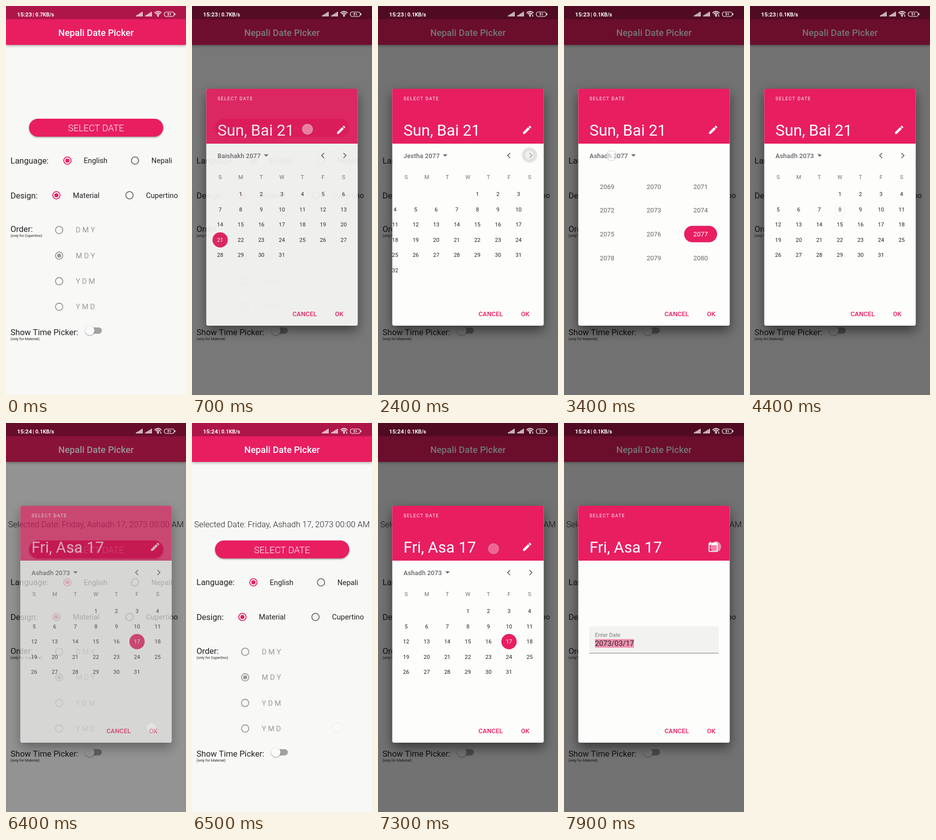
Animation of 360x780 px, one loop 8000 ms. Source, as an HTML page with a canvas:

```html
<!DOCTYPE html>
<html lang="en">
<head>
<meta charset="utf-8">
<title>Nepali Date Picker</title>
<style>
html, body { margin: 0; width: 100%; height: 100%; overflow: hidden; background: #f8f9f7; }
canvas { display: block; width: 360px; height: 780px; }
</style>
</head>
<body>
<canvas id="stage"></canvas>
<script>
const W = 360, H = 780, LOOP = 8000;
const PINK = '#e81e61', PAGE = '#f8f9f7', INK = '#222', SOFT = '#666';
const dpr = window.devicePixelRatio || 1;
const stage = document.getElementById('stage');
const layer = document.createElement('canvas');
for (const c of [stage, layer]) { c.width = W * dpr; c.height = H * dpr; }
const view = stage.getContext('2d'), sheet = layer.getContext('2d');
let g = view;

const EDIT = new Path2D('M3 17.25V21h3.75L17.81 9.94l-3.75-3.75L3 17.25zM20.71 7.04c.39-.39.39-1.02 0-1.41l-2.34-2.34c-.39-.39-1.02-.39-1.41 0l-1.83 1.83 3.75 3.75 1.83-1.83z');
const CALENDAR = new Path2D('M20 3h-1V1h-2v2H7V1H5v2H4c-1.1 0-2 .9-2 2v16c0 1.1.9 2 2 2h16c1.1 0 2-.9 2-2V5c0-1.1-.9-2-2-2zm0 18H4V8h16v13z');

const MONTHS = {
  bai77: { name: 'Baishakh 2077', first: 1, days: 31, sel: 21 },
  jes77: { name: 'Jestha 2077', first: 4, days: 32 },
  ash77: { name: 'Ashadh 2077', first: 1, days: 31 },
  ash73: { name: 'Ashadh 2073', first: 3, days: 31 }
};

const clamp = x => Math.max(0, Math.min(1, x));
const ramp = (t, from, to) => clamp((t - from) / (to - from));

function bezier(x1, y1, x2, y2) {
  const at = (a, b, s) => 3 * a * s * (1 - s) ** 2 + 3 * b * s * s * (1 - s) + s ** 3;
  return x => {
    let lo = 0, hi = 1;
    for (let i = 0; i < 20; i++) {
      const mid = (lo + hi) / 2;
      if (at(x1, x2, mid) < x) lo = mid; else hi = mid;
    }
    return x <= 0 ? 0 : x >= 1 ? 1 : at(y1, y2, lo);
  };
}
const ease = bezier(.25, .1, .25, 1);
const easeOut = bezier(0, 0, .58, 1);

// y is the middle of the capital letters
function text(str, x, y, size, { color = INK, weight = 400, align = 'left', gap = 0 } = {}) {
  g.font = `${weight} ${size}px Roboto, sans-serif`;
  g.letterSpacing = gap + 'px';
  g.textAlign = align;
  g.fillStyle = color;
  g.fillText(str, x, y + size * .356);
  return g.measureText(str).width;
}

function disc(x, y, r, color) {
  g.beginPath();
  g.arc(x, y, r, 0, 7);
  g.fillStyle = color;
  g.fill();
}

function box(x, y, w, h, r, color) {
  g.beginPath();
  g.roundRect(x, y, w, h, r);
  g.fillStyle = color;
  g.fill();
}

function line(points, color, width) {
  g.beginPath();
  points.forEach(([x, y]) => g.lineTo(x, y));
  g.strokeStyle = color;
  g.lineWidth = width;
  g.stroke();
}

function withShadow(color, blur, dy, draw) {
  g.save();
  g.shadowColor = color;
  g.shadowBlur = blur * dpr;
  g.shadowOffsetY = dy * dpr;
  draw();
  g.restore();
}

function radio(x, y, on, color) {
  g.beginPath();
  g.arc(x, y, 7.33, 0, 7);
  g.strokeStyle = color;
  g.lineWidth = 1.83;
  g.stroke();
  if (on) disc(x, y, 4.12, color);
}

function option(label, x, textX, y, on, color, ink) {
  radio(x, y, on, color);
  text(label, textX, y, 14.66, { color: ink });
}

function page(picked) {
  g.fillStyle = PAGE;
  g.fillRect(0, 0, W, H);
  withShadow('rgba(0,0,0,.3)', 5, 2, () => box(0, 0, W, 78, 0, PINK));
  g.fillStyle = '#ae1649';
  g.fillRect(0, 0, W, 26.5);
  text('Nepali Date Picker', 180, 53, 18.33, { color: '#fff', weight: 500, align: 'center' });

  if (picked)
    text('Selected Date: Friday, Ashadh 17, 2073 00:00 AM', 180, 203.5, 16.5, { weight: 300, align: 'center' });

  g.save();
  g.translate(0, picked ? 9.5 : 0);
  withShadow('rgba(0,0,0,.35)', 3, 1.8, () => box(46, 226, 268.5, 36, 18, PINK));
  text('SELECT DATE', 180, 244.5, 18.33, { color: '#fff', weight: 300, align: 'center' });

  text('Language:', 9, 310, 16.5);
  option('English', 122.8, 155.5, 310, true, PINK, INK);
  option('Nepali', 258, 290.7, 310, false, '#6d6d6c', INK);
  text('Design:', 9, 379.8, 16.5);
  option('Material', 100.8, 133.7, 379.5, true, PINK, INK);
  option('Cupertino', 247, 280, 379.5, false, '#6d6d6c', INK);

  text('Order:', 9, 447.5, 16.5);
  text('(only for Cupertino)', 9, 460.5, 7.33);
  ['D M Y', 'M D Y', 'Y D M', 'Y M D'].forEach((name, i) =>
    option(name, 106.3, 139.5, 449.2 + i * 51.3, i === 1, '#9a9a99', '#9a9a99'));

  text('Show Time Picker:', 9, 653.8, 16.5);
  text('(only for Material)', 9, 667, 7.33);
  box(161.5, 644.4, 30.2, 12.8, 6.4, '#a2a2a1');
  withShadow('rgba(0,0,0,.4)', 2.5, 1, () => disc(167.8, 650.8, 9.2, '#fafafa'));
  g.restore();
}

function statusBar(t) {
  const white = '#fff';
  text(t < 6200 ? '15:23' : '15:24', 22, 16.5, 11.6, { color: white, weight: 700 });
  text(t < 2300 ? '| 0.7KB/s' : '| 0.1KB/s', 53.5, 16.8, 10.4, { color: white, weight: 700 });
  for (const x of [260, 278.5])
    for (let i = 0; i < 5; i++) box(x + i * 2.8, 18.7 - i * 1.75, 1.9, 2.3 + i * 1.75, 0, white);
  for (const r of [3.2, 6.4, 9.6]) {
    g.beginPath();
    g.arc(304, 20.5, r, -Math.PI * .76, -Math.PI * .24);
    g.strokeStyle = white;
    g.lineWidth = 1.6;
    g.stroke();
  }
  disc(304, 20, 1.5, white);
  if (t > 1400) {
    line([[309.5, 17], [309.5, 21]], white, 1);
    line([[308, 19.7], [309.5, 21.2], [311, 19.7]], white, .8);
  }
  g.beginPath();
  g.roundRect(316.5, 12, 20, 9, 4.3);
  g.strokeStyle = white;
  g.lineWidth = 1.2;
  g.stroke();
  box(337.3, 14.6, 1.4, 3.8, .7, white);
  text('51', 326.7, 16.6, 7.2, { color: white, weight: 700, align: 'center' });
}

function monthGrid(m, dx, sel) {
  for (let d = 1; d <= m.days; d++) {
    const cell = m.first + d - 1;
    const x = 56.3 + (cell % 7) * 41.15 + dx;
    const y = 377.3 + Math.floor(cell / 7) * 30.55;
    if (d === sel) disc(x, y, 15.3, PINK);
    text(String(d), x, y, 11, { color: d === sel ? '#fff' : INK, align: 'center' });
  }
}

function yearGrid() {
  for (let i = 0; i < 12; i++) {
    const x = 86.2 + (i % 3) * 93.5, y = 362 + Math.floor(i / 3) * 47.66;
    const on = i === 8;
    if (on) box(x - 33, y - 16.5, 66, 33, 16.5, PINK);
    text(String(2069 + i), x, y, 12.83, { color: on ? '#fff' : SOFT, align: 'center' });
  }
}

function calendar(t) {
  // page position: 0 Baishakh, 1 Jestha, 2 Ashadh
  const pos = ease(ramp(t, 1884, 2084)) + ease(ramp(t, 2384, 2584));
  const pages = [MONTHS.bai77, MONTHS.jes77, MONTHS.ash77];
  const later = t >= 4220, years = t >= 3400 && !later;
  const shown = later ? MONTHS.ash73 : pages[Math.round(pos)];

  const end = 51 + text(shown.name, 51, 300, 12.83, { color: SOFT, weight: 500, gap: .09 });
  g.save();
  g.translate(end + 11, 299.8);
  g.rotate(Math.PI * (ramp(t, 3400, 3600) - ramp(t, 4220, 4420)));
  g.beginPath();
  g.moveTo(-4.6, -2.3);
  g.lineTo(4.6, -2.3);
  g.lineTo(0, 2.3);
  g.fillStyle = SOFT;
  g.fill();
  g.restore();

  if (years) return yearGrid();

  for (const [on, hold, off] of [[1770, 1950, 2095], [2270, 2480, 2800]]) {
    const a = ramp(t, on, on + 60) * (1 - ramp(t, hold, off));
    if (a > 0) disc(303, 299, 8 + 7.5 * ramp(t, on, on + 120), `rgba(40,25,30,${.11 * a})`);
  }
  line([[264.2, 294.8], [259.2, 299.8], [264.2, 304.8]], SOFT, 1.7);
  line([[303, 294.8], [308, 299.8], [303, 304.8]], SOFT, 1.7);
  [...'SMTWTFS'].forEach((c, i) =>
    text(c, 56.3 + i * 41.15, 343, 11, { color: '#707070', align: 'center' }));

  g.save();
  g.beginPath();
  g.rect(28.5, 358, 303, 200);
  g.clip();
  if (later) monthGrid(MONTHS.ash73, 0, t >= 5450 ? 17 : 0);
  else pages.forEach((m, i) => {
    if (Math.abs(i - pos) < 1) monthGrid(m, (i - pos) * 303, m.sel);
  });
  g.restore();
}

function dateField(t) {
  box(51, 407.5, 258, 54, [3.7, 3.7, 0, 0], '#f2f3f1');
  g.fillStyle = '#7c7c7b';
  g.fillRect(51, 461, 258, 1);
  text('Enter Date', 62, 425, 11, { color: '#7a7a79' });
  if (t >= 7850) box(62, 433.3, 78, 17.2, 0, '#f18fb0');
  text('2073/03/17', 62, 442, 14.66);
}

function dialog(t) {
  const typing = t >= 7780;
  withShadow('rgba(0,0,0,.5)', 22, 10, () => box(28.5, 166, 303, 475, 3.7, '#fdfefc'));
  box(28.5, 166, 303, 110, [3.7, 3.7, 0, 0], PINK);
  text('SELECT DATE', 51, 186, 9.17, { color: '#fff', gap: 1.37 });
  text(t < 5450 ? 'Sun, Bai 21' : 'Fri, Asa 17', 51, 248.7, 31.2, { color: '#fff' });
  g.save();
  g.translate(287.3, 237.3);
  g.scale(.9165, .9165);
  g.fillStyle = '#fff';
  g.fill(typing ? CALENDAR : EDIT);
  g.restore();
  if (typing) dateField(t); else calendar(t);
  text('CANCEL', 201, 617.3, 12.83, { color: PINK, weight: 500 });
  text('OK', 286, 617.3, 12.83, { color: PINK, weight: 500 });
}

// x, y, press, start of fade, end of fade
const TOUCHES = [
  [231, 247, 480, 680, 1080],
  [303, 299, 1780, 1880, 2090],
  [303, 299, 2280, 2450, 2980],
  [95, 300, 3290, 3450, 3790],
  [180, 410, 4180, 4240, 4490],
  [262, 438, 5390, 5480, 5690],
  [291, 611, 6180, 6310, 6600],
  [231, 252, 6980, 7180, 7580],
  [303.5, 248, 7780, 7950, 8400]
];

function touches(t) {
  for (const [x, y, press, hold, end] of TOUCHES) {
    if (t < press || t > end) continue;
    g.globalAlpha = 1 - ramp(t, hold, end);
    disc(x, y, 10, 'rgba(255,255,255,.45)');
    g.beginPath();
    g.arc(x, y, 10, 0, 7);
    g.strokeStyle = 'rgba(205,203,203,.6)';
    g.lineWidth = 1.6;
    g.stroke();
    g.globalAlpha = 1;
  }
}

function render(t) {
  const open = t < 6310 ? ramp(t, 590, 740) : t < 6800 ? 1 - ramp(t, 6320, 6470) : ramp(t, 7090, 7240);
  g = view;
  g.setTransform(dpr, 0, 0, dpr, 0, 0);
  page(t >= 6270);
  if (open > 0) {
    g.fillStyle = `rgba(0,0,0,${.54 * ease(open)})`;
    g.fillRect(0, 0, W, H);
    g = sheet;
    g.setTransform(dpr, 0, 0, dpr, 0, 0);
    g.clearRect(0, 0, W, H);
    dialog(t);
    g = view;
    g.globalAlpha = easeOut(open);
    g.drawImage(layer, 0, 0, W, H);
    g.globalAlpha = 1;
  }
  statusBar(t);
  touches(t);
}

function tick() {
  render(performance.now() % LOOP);
  requestAnimationFrame(tick);
}
tick();
</script>
</body>
</html>
```
